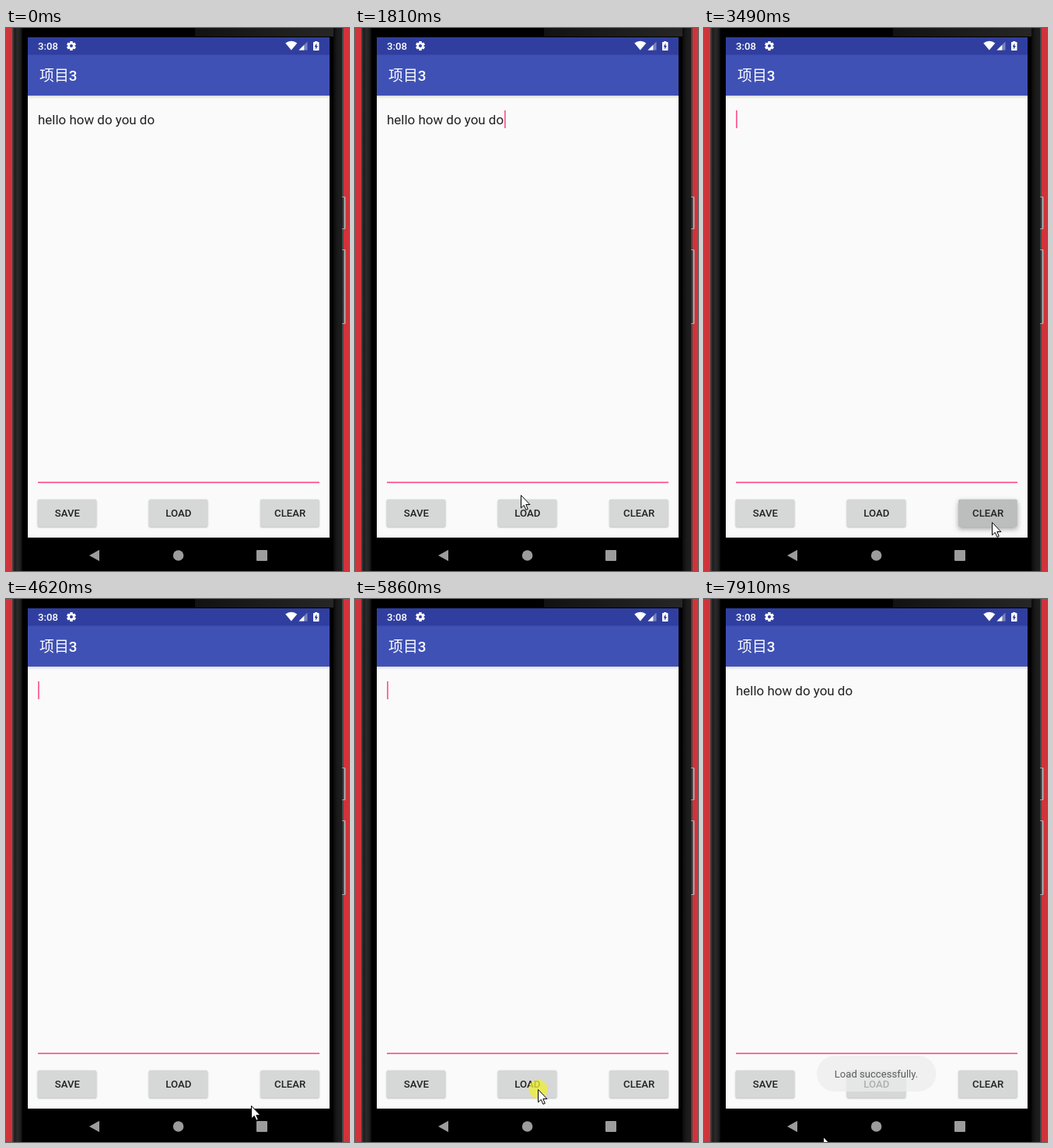
These frames come from a looping animation (441x699 px, 8 s). An HTML page with a canvas:

```html
<!DOCTYPE html>
<html lang="zh">
<head>
<meta charset="utf-8">
<title>项目3</title>
<style>
  html, body { margin: 0; width: 100%; height: 100%; overflow: hidden; background: #d1333a; }
  canvas { display: block; width: 441px; height: 699px; }
</style>
</head>
<body>
<canvas id="stage" width="441" height="699"></canvas>
<script>
const ctx = document.getElementById('stage').getContext('2d');
const LOOP = 8000;
const PINK = '#ff4081', INDIGO = '#303f9f', GRAY = '#9c9c9c';
const SANS = 'Roboto, "Noto Sans", sans-serif';

// Each click: pointer down, pointer up, button back to rest
const CLEAR = { down: 2970, up: 3200, rest: 3890 };
const LOAD = { down: 5720, up: 6110, rest: 6630 };

const ENTRY = { x: 150, y: 704 };
const MOVES = [
  { from: 310, to: 1180, x: 115, y: 640 },
  { from: 1180, to: 1810, x: 213, y: 601 },
  { from: 1810, to: 2810, x: 370, y: 636 },
  { from: CLEAR.rest, to: 4610, x: 315, y: 652 },
  { from: 4710, to: 5510, x: 235, y: 631 },
  { from: 6710, to: 6910, x: 213, y: 667 },
  { from: 6910, to: 7910, x: 153, y: 692 }
];

const clamp = v => Math.max(0, Math.min(1, v));
const ramp = (t, a, b) => clamp((t - a) / (b - a));
const mod = (a, n) => ((a % n) + n) % n;
const held = (t, click) => t >= click.down && t < click.up;
const pressed = (t, click) => t < click.rest ? ramp(t, click.up - 50, click.up + 200) : 0;
const caretOn = t => t >= 40 && mod(t - 1210, 2270) < 1300;

function rect(x, y, w, h, fill) {
  ctx.fillStyle = fill;
  ctx.fillRect(x, y, w, h);
}

function disc(x, y, r, fill) {
  ctx.fillStyle = fill;
  ctx.beginPath();
  ctx.arc(x, y, r, 0, Math.PI * 2);
  ctx.fill();
}

function poly(points, fill) {
  ctx.beginPath();
  points.forEach(([x, y]) => ctx.lineTo(x, y));
  ctx.closePath();
  ctx.fillStyle = fill;
  ctx.fill();
}

function rounded(x, y, w, h, r, fill) {
  ctx.beginPath();
  ctx.roundRect(x, y, w, h, r);
  ctx.fillStyle = fill;
  ctx.fill();
}

function text(str, x, y, font, fill, align = 'left') {
  ctx.font = font;
  ctx.fillStyle = fill;
  ctx.textAlign = align;
  ctx.fillText(str, x, y);
}

function fade(x0, y0, x1, y1, ...colors) {
  const g = ctx.createLinearGradient(x0, y0, x1, y1);
  colors.forEach((c, i) => g.addColorStop(i / (colors.length - 1), c));
  return g;
}

function sideButton(y, h) {
  rounded(432, y, 4.5, h, 1, '#b0b0b0');
  rect(432, y + 1, 2.5, h - 2, '#333');
}

function phone() {
  rect(0, 0, 441, 699, '#d1333a');
  rect(8, 0, 426, 699, '#000');
  rect(8, 0, 13, 699, fade(8, 0, 21, 0, '#4a4a4a', '#1c1c1c', '#2a2a2a', '#222', '#0c0c0c'));
  rect(421, 0, 13, 699, fade(421, 0, 434, 0, '#0a0a0a', '#181818', '#1e1e1e', '#161616'));
  rect(432.5, 0, 1, 699, '#777');
  rect(243, 0, 178, 11, fade(243, 0, 421, 0, '#121212', '#1c1c1c', '#262626'));
  sideButton(217, 42);
  sideButton(285, 96);
}

function gear(x, y) {
  ctx.save();
  ctx.translate(x, y);
  for (let i = 0; i < 6; i++) {
    rect(-1.7, -6, 3.4, 4, '#fff');
    ctx.rotate(Math.PI / 3);
  }
  disc(0, 0, 4.5, '#fff');
  disc(0, 0, 2, INDIGO);
  ctx.restore();
}

function wifi(x, y) {
  ctx.beginPath();
  ctx.moveTo(x, y);
  ctx.arc(x, y, 11.8, -Math.PI * 0.72, -Math.PI * 0.28);
  ctx.closePath();
  ctx.fillStyle = '#fff';
  ctx.fill();
}

function signal(x, y, size, level) {
  const wedge = (s, fill) => poly([[x, y], [x + s, y - s], [x + s, y]], fill);
  wedge(size, 'rgba(255,255,255,.35)');
  wedge(size * level, '#fff');
}

function battery(x, y) {
  rounded(x, y + 1, 7.5, 11, 0.7, '#fff');
  rect(x + 2.2, y, 3.1, 1.5, '#fff');
  poly([[x + 4.4, y + 2.6], [x + 1.6, y + 7.2], [x + 3.1, y + 7.2],
        [x + 3.1, y + 10.4], [x + 6, y + 5.9], [x + 4.4, y + 5.9]], INDIGO);
}

function statusBar() {
  rect(28, 12, 388, 23, INDIGO);
  text('3:08', 41, 28, '500 13.2px ' + SANS, '#fff');
  gear(84, 23);
  wifi(366.8, 28.5);
  signal(376.5, 28.5, 11, 0.62);
  battery(395, 17);
}

function appBar() {
  rect(28, 34.5, 388, 52.5, '#3f51b5');
  rect(28, 87, 388, 4, fade(0, 87, 0, 91, 'rgba(0,0,0,.13)', 'rgba(0,0,0,0)'));
  text('项目', 43, 68, '400 18.9px "Noto Sans CJK SC", "Noto Sans CJK", sans-serif', '#fff');
  text('3', 80.8, 68, '500 18.9px ' + SANS, '#fff');
}

function button(label, x, press = 0) {
  const tone = 215 - 26 * press;
  ctx.save();
  ctx.shadowColor = `rgba(0,0,0,${0.25 + 0.1 * press})`;
  ctx.shadowBlur = 2 + 4 * press;
  ctx.shadowOffsetY = 1 + 2 * press;
  rounded(x - 0.4, 606.7, 75.8, 35.2, 2, `rgb(${tone - 1},${tone},${tone})`);
  ctx.restore();
  text(label, x + 37.8, 629, '500 13.2px ' + SANS, '#222', 'center');
}

function editor(t) {
  const filled = t < CLEAR.up || t >= LOAD.up;
  if (filled) text('hello how do you do', 41, 124, '400 16.95px ' + SANS, '#212121');
  if (caretOn(t)) rect(t < CLEAR.up ? 192.2 : 41.2, 106, 1.5, 23, PINK);
  rect(41, 584.2, 362, 1.5, PINK);
}

function navBar() {
  rect(28, 656, 388, 43, '#000');
  poly([[107, 679], [120, 671.8], [120, 686.2]], GRAY);
  disc(221.6, 679, 6.8, GRAY);
  rounded(322, 672, 14, 14, 1, GRAY);
}

function toast(t) {
  ctx.globalAlpha = ramp(t, 6760, 8410);
  rounded(145, 588, 153.5, 46, 23, '#ededed');
  text('Load successfully.', 221.5, 616, '400 13.1px ' + SANS, '#1e1e1e', 'center');
  ctx.globalAlpha = 1;
}

function pointer(t) {
  // The pointer advances ten times a second
  const step = Math.floor((t - 10) / 100) * 100 + 10;
  let { x, y } = ENTRY;
  for (const m of MOVES) {
    const k = ramp(step, m.from, m.to);
    x += (m.x - x) * k;
    y += (m.y - y) * k;
  }

  if (held(t, CLEAR) || held(t, LOAD)) disc(x + 0.5, y, 12, 'rgba(238,238,50,.76)');
  ctx.save();
  ctx.translate(Math.round(x) + 0.5, Math.round(y) + 0.5);
  poly([[0, 0], [0, 16.3], [3.8, 12.9], [6.4, 18.8], [8.8, 17.8], [6.3, 12], [11.4, 12]], '#fff');
  ctx.strokeStyle = '#000';
  ctx.lineWidth = 1;
  ctx.stroke();
  ctx.restore();
}

function draw(t) {
  phone();
  rect(28, 34, 388, 622, '#fafafa');
  statusBar();
  appBar();
  editor(t);
  button('SAVE', 41);
  button('LOAD', 184, pressed(t, LOAD));
  button('CLEAR', 327.4, pressed(t, CLEAR));
  navBar();
  toast(t);
  pointer(t);
}

function tick(now) {
  draw(now % LOOP);
  requestAnimationFrame(tick);
}
requestAnimationFrame(tick);
</script>
</body>
</html>
```
